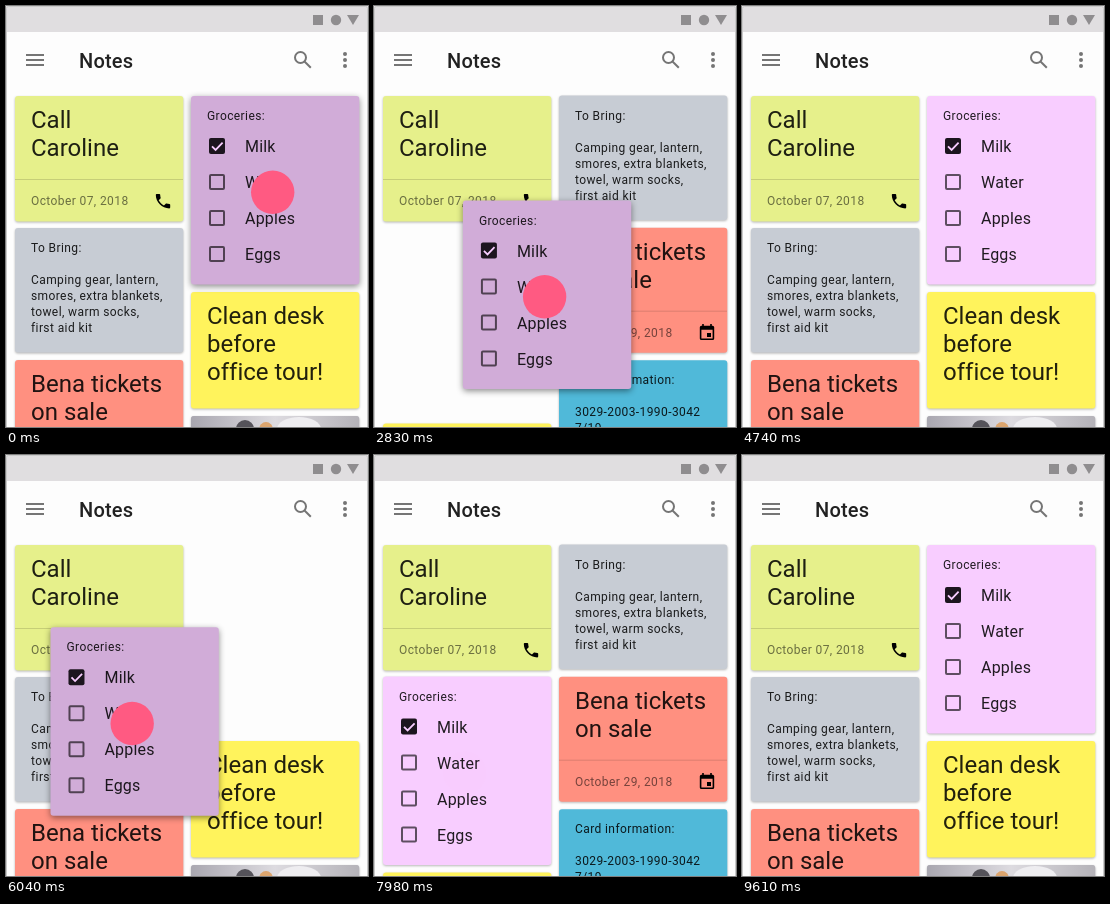
Animation, 362 px wide and 421 px high, one loop 9760 ms. Source, as an HTML page:

```html
<!DOCTYPE html>
<html lang="en">
<head>
<meta charset="utf-8">
<title>Notes</title>
<style>
  html, body { margin: 0; width: 100%; height: 100%; overflow: hidden; background: #fdfdfd; }
  svg { display: block; font-family: Roboto, sans-serif; font-variant-ligatures: none; }
  text { fill: #000; fill-opacity: .87; white-space: pre; }
  .big { font-size: 24px; }
  .item { font-size: 16px; letter-spacing: .2px; }
  .small { font-size: 12px; letter-spacing: .4px; }
  .date { fill-opacity: .54; }
  .paper { filter: drop-shadow(0 1px 1px rgba(0, 0, 0, .28)); }
  .title { font-size: 20px; font-weight: 500; letter-spacing: .2px; }
  .icon { fill: #757575; }
  .status { fill: #8f8d8f; }
</style>
</head>
<body>
<svg width="362" height="421" viewBox="0 0 362 421">
  <defs>
    <clipPath id="round"><rect width="168" height="125" rx="3"/></clipPath>
    <linearGradient id="fur">
      <stop stop-color="#a9a7b0"/>
      <stop offset=".5" stop-color="#dddbe0"/>
      <stop offset="1" stop-color="#b5b3b9"/>
    </linearGradient>
  </defs>
  <rect width="362" height="421" fill="#fdfdfd"/>
  <g id="notes"></g>
  <circle id="touch" r="21.7" fill="#ff5a82"/>
  <rect width="362" height="26" fill="#e0dee0"/>
  <g class="status">
    <rect x="307" y="9" width="10" height="10"/>
    <circle cx="330" cy="14" r="5.2"/>
    <path d="M341 9h12l-6 10z"/>
  </g>
  <g class="icon">
    <path d="M20 48h18v2H20zM20 53h18v2H20zM20 58h18v2H20z"/>
    <circle cx="339" cy="48" r="2"/>
    <circle cx="339" cy="54" r="2"/>
    <circle cx="339" cy="60" r="2"/>
    <g fill="none" stroke="#757575" stroke-width="2">
      <circle cx="294.5" cy="51.5" r="5.5"/>
      <path d="M298.5 55.5l6.3 6.3"/>
    </g>
  </g>
  <text class="title" x="73" y="62">Notes</text>
  <path d="M.5 421V2.5q0-2 2-2h357q2 0 2 2V421" fill="none" stroke="#c9c9c9"/>
</svg>
<script>
const LOOP = 9760, CYCLE = 5670, OFFSET = 790;
const LEFT = 9, RIGHT = 185;

const text = (cls, x, y, s) => `<text class="${cls}" x="${x}" y="${y}">${s}</text>`;
const lines = (cls, y, step, list) => list.map((s, i) => text(cls, 16, y + i * step, s)).join('');
const big = (...list) => lines('big', 32, 28, list);
const info = (title, ...list) => text('small', 16, 24, title) + lines('small', 56, 16, list);
const footer = (date, icon) =>
  `<path d="M0 83.5h168" stroke="#000" stroke-opacity=".14"/>` + text('small date', 16, 109, date) +
  `<path transform="translate(138.4 95.6) scale(.8)" d="${icon}"/>`;

const PHONE = 'M6.62 10.79c1.44 2.83 3.76 5.14 6.59 6.59l2.2-2.2c.27-.27.67-.36 1.02-.24 1.12.37 2.33.57 3.57.57.55 0 1 .45 1 1V20c0 .55-.45 1-1 1C10.6 21 3 13.4 3 4c0-.55.45-1 1-1h3.5c.55 0 1 .45 1 1 0 1.25.2 2.45.57 3.57.11.35.03.74-.25 1.02z';
const CALENDAR = 'M17 12h-5v5h5zM16 1v2H8V1H6v2H5a2 2 0 0 0-2 2v14a2 2 0 0 0 2 2h14a2 2 0 0 0 2-2V5a2 2 0 0 0-2-2h-1V1zM19 19H5V8h14z';

const checkbox = i => {
  const y = 42 + i * 36;
  return i
    ? `<rect x="19" y="${y + 1}" width="14" height="14" rx="1" fill="none" stroke="#000" stroke-opacity=".62" stroke-width="2"/>`
    : `<rect x="18" y="${y}" width="16" height="16" rx="2" fill="#1c151e"/>
       <path d="M21 50.3l3.6 3.6 7-7.2" fill="none" stroke="#f8cdff" stroke-width="1.8"/>`;
};
const groceries = text('small', 16, 24, 'Groceries:') +
  ['Milk', 'Water', 'Apples', 'Eggs'].map((s, i) => checkbox(i) + text('item', 54, 56 + i * 36, s)).join('');

const photo = `<g clip-path="url(#round)">
  <rect width="168" height="125" fill="url(#fur)"/>
  <ellipse cx="54" cy="13" rx="9" ry="9" fill="#55535a"/>
  <ellipse cx="75" cy="14" rx="7" ry="8" fill="#dca56e"/>
  <ellipse cx="108" cy="13" rx="22" ry="12" fill="#eeedf0"/></g>`;

// colour, height, home place, place after the swap, content
const cards = [
  ['#e6f08b', 125.5, [LEFT, 90], [LEFT, 90], big('Call', 'Caroline') + footer('October 07, 2018', PHONE)],
  ['#bcbac2', 125, [RIGHT, 410], [LEFT, 541.5], photo],
  ['#fff35c', 116.5, [RIGHT, 286], [LEFT, 417.5], big('Clean desk', 'before', 'office tour!')],
  ['#c7ccd4', 124.5, [LEFT, 222], [RIGHT, 89.5], info('To Bring:', 'Camping gear, lantern,', 'smores, extra blankets,', 'towel, warm socks,', 'first aid kit')],
  ['#ff9080', 125, [LEFT, 354], [RIGHT, 221.7], big('Bena tickets', 'on sale') + footer('October 29, 2018', CALENDAR)],
  ['#50b9d9', 125, [LEFT, 486], [RIGHT, 354.3], info('Card information:', '3029-2003-1990-3042', '7/19')],
  ['#f8cdff', 188.5, [RIGHT, 90], [LEFT, 221.6], groceries]
];

const notes = document.getElementById('notes');
const touch = document.getElementById('touch');
notes.innerHTML = cards.map(([color, h, , , body]) =>
  `<g><rect class="paper" width="168.3" height="${h}" rx="3" fill="${color}"/>${body}</g>`).join('');
const groups = [...notes.children];
const held = groups.pop();
const paper = held.firstChild;

const ramp = (u, start, length) => Math.min(1, Math.max(0, (u - start) / length));
const ease = p => p < .5 ? 2 * p * p : 1 - 2 * (1 - p) ** 2;
const move = (u, start, length) => ease(ramp(u, start, length));
const mix = (a, b, p) => a + (b - a) * p;
const place = (el, x, y) => el.setAttribute('transform', `translate(${x} ${y})`);

// Drag along a slightly bowed path, then settle into the slot.
function carry(from, release, slot, bow, drag, drop) {
  const x = mix(from[0], release[0], drag);
  const y = mix(from[1], release[1], drag) + bow * Math.sin(Math.PI * drag);
  return [mix(x, slot[0], drop), mix(y, slot[1], drop)];
}

function draw(now) {
  const u = (now % LOOP + OFFSET) % CYCLE;
  const home = cards[6][2], away = cards[6][3];
  const drop1 = move(u, 2030, 300), drop2 = move(u, 4400, 290);

  const [x, y] = u < 3100
    ? carry(home, [11.5, 188], away, 5, move(u, 811, 506), drop1)
    : carry(away, [181, 82], home, 38, move(u, 3380, 500), drop2);
  place(held, x, y);

  const lift = move(u, 0, 290) - drop1 + move(u, 3100, 290) - drop2;
  const rgb = [[248, 209], [205, 172], [255, 216]].map(([a, b]) => Math.round(mix(a, b, lift)));
  paper.setAttribute('fill', `rgb(${rgb})`);
  paper.style.filter = `drop-shadow(0 ${1 + lift}px ${1 + 2.4 * lift}px rgba(0,0,0,${.28 + .17 * lift}))`;

  touch.setAttribute('cx', x + 81.7);
  touch.setAttribute('cy', y + 96.3);
  touch.setAttribute('opacity',
    ramp(u, 0, 150) - ramp(u, 2010, 150) + ramp(u, 3100, 150) - ramp(u, 4380, 150));

  const swap = move(u, 1230, 530) - move(u, 3780, 530);
  groups.forEach((g, i) => {
    const [, , a, b] = cards[i];
    place(g, mix(a[0], b[0], swap), mix(a[1], b[1], swap));
  });
}

const begin = performance.now();
function tick() {
  draw(performance.now() - begin);
  requestAnimationFrame(tick);
}
tick();
</script>
</body>
</html>
```
